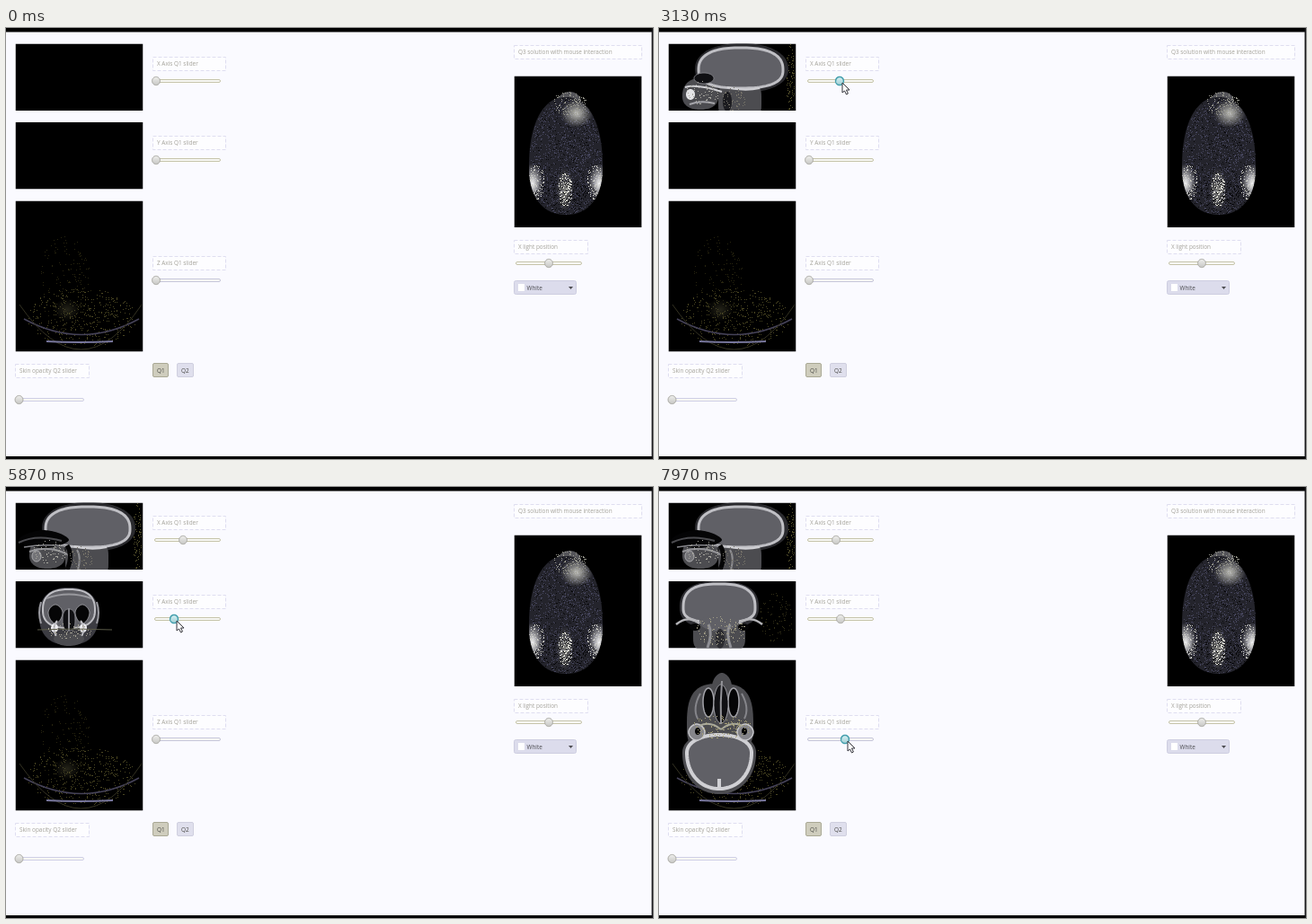
An HTML page with a canvas for the animation above (8000 ms loop, 720 by 480 pixels).

```html
<!DOCTYPE html>
<html lang="en">
<head>
<meta charset="utf-8">
<title>Head scan viewer</title>
<style>
html, body { margin: 0; width: 100%; height: 100%; overflow: hidden; background: #fafaff; }
canvas { display: block; }
</style>
</head>
<body>
<canvas id="stage" width="720" height="480"></canvas>
<script>
const c = document.getElementById('stage').getContext('2d');
const LOOP = 8000;
const START = 167, REACH = 72;
const TISSUE = '#4c4c50', BRAIN = '#606066', BONE = '#bfbfc4', AIR = '#050506', OLIVE = '#4b4722';

// Each drag is a list of moves: begin, end, distance. The pointer glides over in the span "glide".
const AXES = [
  { name: 'X', y: 59, glide: [30, 1830], moves: [[2030, 3000, 34], [3470, 3700, -4]] },
  { name: 'Y', y: 147, glide: [3700, 4170], moves: [[4370, 5130, 24], [5500, 5730, -4], [5870, 6250, 15]] },
  { name: 'Z', y: 281, glide: [6500, 7200], moves: [[7200, 7330, 2], [7500, 7850, 42], [7850, 7970, -4]] }
];
const ENTRY = { x: 402, y: 314 };

const part = (v, from, to) => Math.min(1, Math.max(0, (v - from) / (to - from)));
const ease = (v, from, to) => { const k = part(v, from, to); return k * k * (3 - 2 * k); };
const mix = (a, b, k) => a + (b - a) * k;

function box(x, y, w, h, fill) {
  c.fillStyle = fill;
  c.fillRect(x, y, w, h);
}

function paint(fill, stroke, width = 1) {
  if (fill) { c.fillStyle = fill; c.fill(); }
  if (stroke) { c.strokeStyle = stroke; c.lineWidth = width; c.stroke(); }
}

// Closed superellipse whose upper and lower halves have their own height.
function egg(x, y, rx, up, down, power, fill, stroke, width) {
  const bend = v => Math.sign(v) * Math.abs(v) ** (2 / power);
  c.beginPath();
  for (let a = 0; a < 6.28; a += .06) {
    const s = bend(Math.sin(a));
    c.lineTo(x + rx * bend(Math.cos(a)), y + s * (s < 0 ? up : down));
  }
  c.closePath();
  paint(fill, stroke, width);
}

const oval = (x, y, rx, ry, fill, stroke, width) => egg(x, y, rx, ry, ry, 2, fill, stroke, width);

function curve(x1, y1, bx, by, x2, y2, color, width = 1) {
  c.beginPath();
  c.moveTo(x1, y1);
  c.quadraticCurveTo(bx, by, x2, y2);
  paint(null, color, width);
}

function glow(x, y, rx, ry, rgb, alpha) {
  c.save();
  c.translate(x, y);
  c.scale(rx, ry);
  const g = c.createRadialGradient(0, 0, 0, 0, 0, 1);
  g.addColorStop(0, `rgba(${rgb},${alpha})`);
  g.addColorStop(1, `rgba(${rgb},0)`);
  box(-1, -1, 2, 2, g);
  c.restore();
}

function specks(count, x, y, rx, ry, color) {
  let seed = 97;
  const random = () => (seed = seed * 16807 % 2147483647) / 2147483647;
  c.fillStyle = color;
  for (let i = 0; i < count; i++) {
    const a = random() * 6.283, r = Math.sqrt(random());
    c.fillRect(Math.round(x + rx * r * Math.cos(a)), Math.round(y + ry * r * Math.sin(a)), 1, 1);
  }
}

function panel(x, y, w, h, draw) {
  c.save();
  c.beginPath();
  c.rect(x, y, w, h);
  c.clip();
  box(x, y, w, h, '#000');
  draw();
  c.restore();
}

function layer(alpha, scale, x, y, draw) {
  if (alpha <= 0) return;
  c.save();
  c.globalAlpha = alpha;
  c.translate(x, y);
  c.scale(scale, scale);
  c.translate(-x, -y);
  draw();
  c.restore();
}

// Draws both halves of a symmetric part, with x measured from the axis.
function mirror(x, draw) {
  for (const side of [-1, 1]) {
    c.save();
    c.translate(x, 0);
    c.scale(side, 1);
    draw();
    c.restore();
  }
}

function sagittal(u) {
  if (u <= 0) return;
  layer(part(u, 0, .07), 1, 0, 0, () => {
    specks(160, 92, 52, 28, 34, '#25230f');
    specks(80, 146, 55, 5, 38, '#5a562e');
  });
  const grown = ease(u, .04, .3), middle = 1 - part(Math.abs(u - .417), 0, .05);
  layer(Math.sqrt(grown), mix(.35, 1, grown), 92, 54, () => {
    egg(92, 46, 52, 29, 26, 2.2, '#2a2a2e');
    egg(90, 80, 24, 18, 24, 4, TISSUE);
    egg(46, 76, 20, 20, 15, 2.3, TISSUE);
    egg(91, 47, 47, 25, 20, 2.5, BRAIN, BONE, 3);
    curve(76, 66, 95, 71, 112, 67, '#d0d0d4', 2);
    layer(1 - middle, 1, 0, 0, () => {
      oval(50, 56, 11, 6, '#101013', '#88888e');
      curve(29, 66, 42, 62, 70, 71, '#d0d0d4', 2);
      oval(35, 74, 5, 6, '#e4e4e6');
      curve(34, 85, 46, 80, 62, 84, '#a5a5aa', 2);
      oval(76, 82, 5, 11, '#1c1c20');
    });
    layer(middle, 1, 0, 0, () => {
      egg(42, 59, 28, 11, 9, 1.6, AIR);
      curve(14, 62, 34, 52, 62, 60, TISSUE, 2);
      curve(20, 67, 42, 63, 68, 66, '#87878c', 1.5);
      curve(26, 72, 48, 64, 70, 76, '#96969a', 2);
      oval(34, 77, 5, 6, '#747478', '#b8b8bc');
      curve(68, 65, 75, 76, 68, 92, AIR, 5);
      curve(79, 70, 84, 78, 80, 92, '#8e8e92', 2);
    });
    specks(70, 48, 72, 20, 13, '#a9a8a0');
    specks(65, 83, 79, 14, 13, '#77746a');
  });
}

function coronal(u) {
  if (u <= 0) return;
  const grown = ease(u, .015, .2), back = ease(u, .3, .44);
  layer(grown * (1 - back), mix(.3, 1, grown), 70, 148, () => {
    egg(70, 143, 33, 31, 33, 2.4, '#3c3c42');
    egg(70, 137, 29, 23, 20, 2.5, BRAIN, BONE, 2);
    curve(45, 124, 70, 115, 95, 124, '#99999e', 2);
    mirror(70, () => {
      egg(15, 140, 8, 9, 12, 1.7, AIR, '#a0a0a6');
      curve(31, 128, 35, 140, 31, 152, '#9a9aa0', 2);
      oval(16, 157, 4, 5, '#ececf0');
      curve(13, 149, 20, 157, 13, 168, BONE, 2);
    });
    egg(70, 148, 7, 12, 12, 2.5, '#101013', '#88888e');
    curve(70, 135, 70, 148, 70, 160, '#88888e', 2);
    egg(70, 169, 17, 6, 8, 2, TISSUE);
    curve(35, 159, 76, 157, 118, 159, '#5b5b48');
    specks(75, 70, 160, 27, 9, '#a5a294');
  });
  layer(back, 1, 0, 0, () => {
    specks(90, 130, 145, 20, 28, '#302d16');
    egg(67, 134, 44, 29, 24, 2.5, '#303035');
    egg(67, 165, 29, 18, 18, 4, TISSUE);
    egg(67, 135, 40, 27, 16, 2.7, BRAIN, BONE, 3);
    egg(67, 149, 22, 6, 12, 2, BRAIN);
    mirror(67, () => {
      curve(22, 152, 34, 142, 48, 153, '#b4b4b8', 2.5);
      oval(27, 156, 6, 4, AIR);
      curve(12, 153, 7, 163, 13, 179, '#8f8f94', 3);
    });
    oval(68, 169, 5, 11, '#2c2c30');
    specks(130, 68, 160, 30, 16, '#a29e88');
  });
}

function bed() {
  specks(180, 65, 285, 30, 55, '#28250f');
  specks(420, 84, 322, 62, 33, OLIVE);
  glow(68, 314, 15, 13, '80,78,54', .45);
  curve(20, 324, 84, 359, 148, 324, '#454258', 1.5);
  curve(15, 308, 84, 408, 151, 308, '#343222');
  curve(45, 349, 82, 351, 119, 349, '#77769c', 2);
}

function axial(u) {
  bed();
  if (u <= 0) return;
  const grown = ease(u, -.015, .3), base = ease(u, .36, .52);
  layer(part(u, 0, .04) * (1 - base), 1, 0, 0, () => {
    oval(68, mix(285, 274, grown), mix(6, 39, grown), mix(15, 61, grown), BRAIN, grown > .12 ? BONE : '#55555e', mix(1, 4, grown));
  });
  layer(base, 1, 0, 0, () => {
    egg(68, 267, 37, 48, 30, 3, TISSUE);
    egg(70, 222, 11, 15, 14, 1.8, TISSUE);
    egg(67, 296, 41, 24, 46, 2.1, TISSUE);
    egg(67, 296, 36, 20, 40, 2.1, BRAIN, '#d0d0d4', 4);
    mirror(69, () => {
      egg(14, 239, 6, 15, 17, 2, AIR, '#a4a4aa', 1.5);
      curve(23, 230, 32, 246, 26, 258, '#85858a', 2);
      egg(27, 273, 9, 9, 9, 1.8, '#85858a', '#c8c8cc', 1.5);
      oval(26, 272, 3, 4, AIR);
      curve(0, 270, 12, 260, 24, 266, '#aaaa9c', 2);
      curve(4, 226, 3, 242, 5, 258, '#707076', 1);
    });
    egg(69, 242, 8, 22, 21, 2, '#101013', '#a4a4aa');
    curve(70, 216, 68, 240, 69, 264, '#939398', 2);
    curve(67, 325, 67, 330, 67, 335, '#d0d0d4', 4);
    specks(150, 69, 267, 35, 13, '#a59f76');
  });
}

function volume() {
  egg(627, 82, 13, 11, 12, 2, '#55555a');
  egg(623, 155, 41, 78, 53, 2.25, '#24242c');
  c.save();
  c.clip();
  specks(1100, 623, 145, 41, 66, '#45455c');
  specks(350, 624, 135, 39, 65, '#08080a');
  glow(635, 95, 18, 16, '225,225,215', .8);
  mirror(623, () => {
    glow(37, 173, 12, 22, '255,255,255', .95);
    specks(130, 34, 172, 12, 20, '#cfcfc8');
  });
  glow(622, 180, 10, 24, '215,215,200', .5);
  specks(130, 622, 180, 8, 19, '#e6e6dc');
  specks(220, 622, 188, 38, 20, '#050508');
  c.restore();
  specks(130, 627, 84, 20, 13, '#9a9a90');
}

function text(label, x, y, color = '#a3a198') {
  c.fillStyle = color;
  c.fillText(label, x, y);
}

function caption(label, x, y, w) {
  box(x, y, w, 16, '#fdfdff');
  c.setLineDash([4, 2]);
  c.strokeStyle = '#dfdef0';
  c.lineWidth = 1;
  c.strokeRect(x + .5, y + .5, w, 15);
  c.setLineDash([]);
  text(label, x + 5, y + 10);
}

function rounded(x, y, w, h, r, fill, rim) {
  c.beginPath();
  c.roundRect(x + .5, y + .5, w, h, r);
  paint(fill, rim);
}

function slider(left, y, thumb, active, rim = '#c6c4aa') {
  rounded(left, y - 2, 73, 3, 1.5, '#f7f7f4', rim);
  const g = c.createLinearGradient(0, y - 5, 0, y + 5);
  g.addColorStop(0, active ? '#d9f3f5' : '#f0f0ed');
  g.addColorStop(1, active ? '#9fcdd3' : '#c5c5c3');
  oval(thumb, y, 4.4, 4.6, g, active ? '#439eac' : '#a2a19a', active ? 1.5 : 1);
}

function button(label, x, w, fill, rim) {
  rounded(x, 373, w, 15, 1.5, fill, rim);
  text(label, x + 5, 384, '#4b4b48');
}

function menu(label, x, y) {
  rounded(x, y, 69, 15, 2, '#dcdcec', '#cdcde0');
  box(x + 5, y + 4, 7, 8, '#fff');
  text(label, x + 14.5, y + 10.5, '#4b4b50');
  c.beginPath();
  c.moveTo(x + 61, y + 7);
  c.lineTo(x + 66, y + 7);
  c.lineTo(x + 63.5, y + 10);
  paint('#4b4b50');
}

function pointer(x, y) {
  c.beginPath();
  c.moveTo(x, y);
  c.lineTo(x, y + 11);
  c.lineTo(x + 2.5, y + 9);
  c.lineTo(x + 4.5, y + 13);
  c.lineTo(x + 6.4, y + 12);
  c.lineTo(x + 4.5, y + 8);
  c.lineTo(x + 8, y + 8);
  c.closePath();
  paint('#fff', '#33333a');
}

function render(t) {
  const thumbs = AXES.map(({ moves }) => moves.reduce((x, [from, to, d]) => x + d * part(t, from, to), START));
  const [ux, uy, uz] = thumbs.map(x => (x - START) / REACH);
  const focus = AXES.filter(({ moves }) => t >= moves[0][0]).length - 1;
  const mouse = AXES.reduce((p, { y, glide }, i) => {
    const k = ease(t, ...glide);
    return { x: mix(p.x, thumbs[i] + 3, k), y: mix(p.y, y + 2, k) };
  }, ENTRY);

  box(0, 0, 720, 480, '#fafaff');
  box(0, 0, 720, 4.5, '#000');
  box(0, 477, 720, 3, '#000');
  box(718.5, 0, 1.5, 480, '#18181a');

  panel(10.5, 17.5, 142, 74.5, () => sagittal(ux));
  panel(10.5, 105, 142, 74.5, () => coronal(uy));
  panel(10.5, 192.5, 142, 168, () => axial(uz));
  panel(565.5, 53.5, 142, 168.5, volume);

  c.font = '6.4px "Open Sans", sans-serif';
  AXES.forEach(({ name, y }, i) => {
    const hover = Math.hypot(mouse.x - thumbs[i], mouse.y - y) < 5;
    caption(`${name} Axis Q1 slider`, 163, y - 27, 81);
    slider(165, y, thumbs[i], focus === i || hover, name === 'Z' ? '#c6c6da' : undefined);
  });
  caption('Skin opacity Q2 slider', 10, 374, 82);
  caption('Q3 solution with mouse interaction', 565, 19, 142);
  caption('X light position', 565, 236, 82);
  slider(13, 414, 14.5, false, '#cfcfe6');
  slider(567, 262, 604, false);
  button('Q1', 163, 17, '#cfcdbd', '#aaa995');
  button('Q2', 190, 18, '#dfdfed', '#cfcfdf');
  menu('White', 565, 281);
  if (t >= 30) pointer(mouse.x, mouse.y);
}

function tick() {
  render(performance.now() % LOOP);
  requestAnimationFrame(tick);
}
tick();
</script>
</body>
</html>
```
